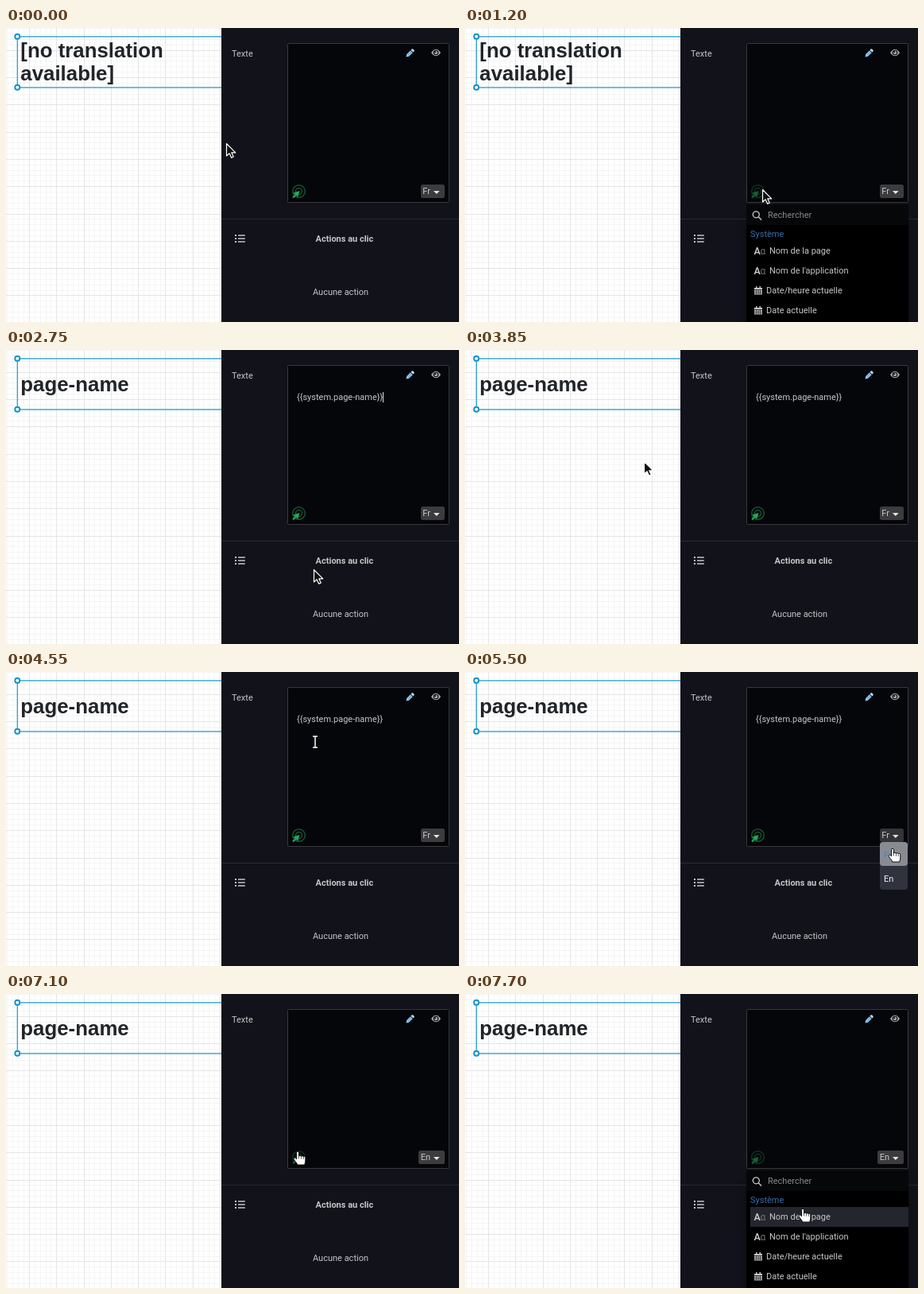
Recreate the animation shown at these times as an HTML page. Size 570 px wide and 370 px high, loop 8000 ms.

```html
<!DOCTYPE html>
<html lang="fr">
<head>
<meta charset="utf-8">
<title>Éditeur de texte</title>
<style>
  html, body { margin: 0; width: 100%; height: 100%; overflow: hidden; background: #fff; }
  svg { display: block; width: 570px; height: 370px; }
  text { font: 11px Roboto, sans-serif; fill: #c6c6c8; white-space: pre; }
  .title { font: bold 25.85px "Liberation Sans", Arial, sans-serif; fill: #212529; }
  .bold { font-weight: 700; }
  .select { fill: none; stroke: #1b9bd0; stroke-width: 1.2; }
  .handle { fill: #fff; stroke: #0e92c8; stroke-width: 1.9; }
  .cursor { stroke-linejoin: round; }
  .panel { filter: drop-shadow(0 4px 5px rgba(0, 0, 0, .3)); }
</style>
</head>
<body>
<svg viewBox="0 0 570 370">
  <defs>
    <g id="aa">
      <text x="363.5" y="285" style="font-size:12.5px;font-weight:500;fill:#d0d0d0">A</text>
      <text x="371.5" y="285" style="font-size:12px;fill:#6f6f74">ɑ</text>
    </g>
    <g id="cal">
      <path d="M364 327h10v2.2h-10zM366 325h1.5v2H366zM370.5 325h1.5v2h-1.5zM364 330h10v4.7q0 .8-.8.8h-8.4q-.8 0-.8-.8z" fill="#c4c4c6"/>
      <path d="M364 331.8h10M364 333.7h10M366.5 330v5.5M369 330v5.5M371.5 330v5.5" stroke="#000" stroke-width=".5"/>
    </g>
  </defs>

  <rect width="271" height="370" fill="#fff"/>
  <path id="minor" stroke="#f5f5f5"/>
  <path id="major" stroke="#e5e5e5"/>
  <g id="before">
    <text class="title" x="18.3" y="37">[no translation</text>
    <text class="title" x="18.3" y="66">available]</text>
  </g>
  <text id="after" class="title" x="18.3" y="52">page-name</text>
  <path class="select" d="M280 10.8H14.3V74.8H280"/>
  <circle class="handle" cx="14.3" cy="10.8" r="3"/>
  <circle class="handle" cx="14.3" cy="74.8" r="3"/>

  <rect x="271" width="299" height="370" fill="#12121a"/>
  <text x="284" y="36">Texte</text>
  <rect x="354.5" y="19.5" width="203" height="200" rx="1" fill="#050609" stroke="#38383c"/>
  <g transform="translate(503.5 36.5) rotate(-45)">
    <path d="M0 0L3-2H9.6V2H3Z" fill="#8cc4ef"/>
    <path d="M10.4-2h1.6q1.2 0 1.2 1.2v1.6q0 1.2-1.2 1.2h-1.6z" fill="#b9dcf5"/>
    <path d="M4 0H9.6" stroke="#4f8fc4" stroke-width=".8"/>
  </g>
  <path d="M535 31q6-8.6 12 0q-6 8.6-12 0z" fill="#a9a9ab"/>
  <circle cx="541" cy="31" r="3.3" fill="#0a0b0e"/>
  <circle cx="541" cy="31" r="2.2" fill="#a9a9ab"/>
  <circle cx="540.2" cy="30.2" r="1" fill="#0a0b0e"/>

  <text id="code" x="366" y="63">{{system.page-name}}</text>
  <path id="caret" d="M474.5 53V66" stroke="#ddd"/>

  <g id="target">
    <g fill="none" stroke="#175330" stroke-width="1.5">
      <circle cx="368.5" cy="205.5" r="7.8"/>
      <circle cx="368.5" cy="205.5" r="4"/>
    </g>
    <path d="M369.5 205l-2.4 8-2-2.2-3.2 3.4-1.6-1.6 3.3-3.2-2.3-2z" fill="#25a95a"/>
  </g>

  <rect id="button" y="197" height="17" rx="2.5"/>
  <text id="lang" x="534" y="209" text-anchor="end"></text>
  <path d="M538 205h7.6l-3.8 4z" fill="#e4e4e4"/>

  <path d="M271 240.5H570" stroke="#2a2a31"/>
  <path d="M288 260h2v2h-2zM288 264h2v2h-2zM288 268h2v2h-2zM292 260.2h8.8v1.6H292zM292 264.2h8.8v1.6H292zM292 268.2h8.8v1.6H292z" fill="#c6c6c8"/>
  <text class="bold" x="389.6" y="269">Actions au clic</text>
  <text x="386" y="336">Aucune action</text>

  <g id="menu">
    <rect class="panel" x="354" y="222" width="204" height="160" fill="#000"/>
    <rect x="354" y="222" width="204" height="26" fill="#060709"/>
    <g fill="none" stroke="#cfcfd1" stroke-width="1.3">
      <circle cx="366.3" cy="234.8" r="4"/>
      <path d="M369.3 237.8l3.7 3.7"/>
    </g>
    <text x="381" y="239" style="fill:#88888c">Rechercher</text>
    <text x="359" y="263" style="fill:#3a6ea8">Système</text>
    <rect id="row" x="359" y="268" width="199" height="25" fill="#24262e"/>
    <use href="#aa"/>
    <text x="383" y="284">Nom de la page</text>
    <use href="#aa" y="25"/>
    <text x="383" y="309">Nom de l'application</text>
    <use href="#cal"/>
    <text x="379" y="334">Date/heure actuelle</text>
    <use href="#cal" y="25"/>
    <text x="379" y="359">Date actuelle</text>
  </g>

  <g id="drop">
    <rect x="522" y="214" width="35" height="60" rx="4" fill="#30323e"/>
    <rect id="pick" x="522" width="35" height="30" rx="4" fill="#898b93"/>
    <text x="527" y="234" style="fill:#3b86c4">Fr</text>
    <text x="527" y="264" style="fill:#f2f2f2">En</text>
  </g>

  <g id="cursor" class="cursor">
    <path id="arrow" d="M.5.5V16L4.1 12.8L6.6 18.3L9.2 17.1L6.8 11.8H11.8Z" fill="#111" stroke="#fff" stroke-width="1.2"/>
    <g id="beam" fill="none">
      <path d="M-3-7H3M-3 7H3M0-7V7" stroke="#000" stroke-width="3"/>
      <path d="M-3-7H3M-3 7H3M0-7V7" stroke="#fff" stroke-width="1.5"/>
    </g>
    <g id="hand">
      <path d="M-1.5 10V1.8a1.5 1.5 0 0 1 3 0V6.5a1.4 1.4 0 0 1 2.9.3a1.4 1.4 0 0 1 2.8.6a1.3 1.3 0 0 1 2.6.7V12c0 2-1 3-1 5H-.3C-.8 14.5-4.3 11.7-4.8 9.5c-.2-1.7 1.7-1.9 2.4-.7z" fill="#fff" stroke="#111"/>
      <path d="M1.5 6V9.5M4.4 7V9.8M7.2 8V10" stroke="#333" stroke-width=".8"/>
    </g>
  </g>
</svg>
<script>
  const LOOP = 8000, TICK = 50;
  const $ = id => document.getElementById(id);
  const show = (id, on) => $(id).style.display = on ? '' : 'none';

  // Pointer hotspot: time, x, y
  const path = [
    [0, 277, 145], [100, 277, 145], [350, 328, 171], [550, 381, 198], [700, 374, 203],
    [1800, 374, 203], [2350, 387, 276],
    [3400, 387, 276], [3750, 255, 160], [4050, 138, 82],
    [4150, 138, 82], [4250, 128, 95], [4550, 389, 88],
    [4650, 389, 88], [5100, 538, 207],
    [5450, 538, 207], [5500, 538, 222], [5800, 537, 254],
    [6750, 537, 254], [7100, 367, 198],
    [7350, 367, 198], [7700, 425, 270], [LOOP, 425, 270]
  ];

  function pointer(t) {
    const i = path.findIndex(k => k[0] > t);
    const [t0, x0, y0] = path[i - 1], [t1, x1, y1] = path[i];
    const p = (t - t0) / (t1 - t0), e = p * p * (3 - 2 * p);
    return [x0 + (x1 - x0) * e, y0 + (y1 - y0) * e];
  }

  function grid(id, step) {
    let d = '';
    for (let x = 29.42 % step; x < 271; x += step) d += `M${Math.floor(x) + .5} 0V370`;
    for (let y = 28.2 % step; y < 370; y += step) d += `M0 ${Math.floor(y) + .5}H271`;
    $(id).setAttribute('d', d);
  }

  function draw(t) {
    const [x, y] = pointer(t);
    const during = (a, b) => t >= a && t < b;
    const over = (l, top, r, b) => x >= l && x < r && y >= top && y < b;

    const menu = during(1200, 2750) || t >= 7250;
    const drop = during(5300, 6000);
    const english = t >= 6000;
    const left = english ? 519 : 522;
    const onIcon = over(360, 197, 377, 215);
    const onButton = over(left, 197, 552, 214);
    const onRow = menu && over(359, 268, 558, 293);
    const onDrop = during(5300, 6350) && over(522, 214, 557, 274);

    show('before', t < 2750);
    show('after', t >= 2750);
    show('code', during(2750, 6000));
    show('caret', during(2750, 3450) || during(3950, 4450));
    show('menu', menu);
    show('row', onRow);
    show('drop', drop);
    show('pick', onDrop);
    $('pick').setAttribute('y', y < 244 ? 214 : 244);
    $('target').style.opacity = menu || onIcon ? .55 : 1;
    $('button').setAttribute('x', left);
    $('button').setAttribute('width', 552 - left);
    $('button').setAttribute('fill', onButton || drop ? '#343437' : '#3c3c3e');
    $('lang').textContent = english ? 'En' : 'Fr';

    const hand = onRow || onDrop || onButton || (onIcon && !menu);
    const beam = !hand && (menu ? over(354, 222, 558, 248) : over(354, 19, 558, 220));
    show('hand', hand);
    show('beam', beam);
    show('arrow', !hand && !beam);
    $('cursor').setAttribute('transform', `translate(${Math.round(x)} ${Math.round(y)})`);
  }

  function frame() {
    draw(Math.floor(performance.now() % LOOP / TICK) * TICK);
    requestAnimationFrame(frame);
  }

  grid('minor', 34.3 / 5);
  grid('major', 34.3);
  frame();
</script>
</body>
</html>
```
